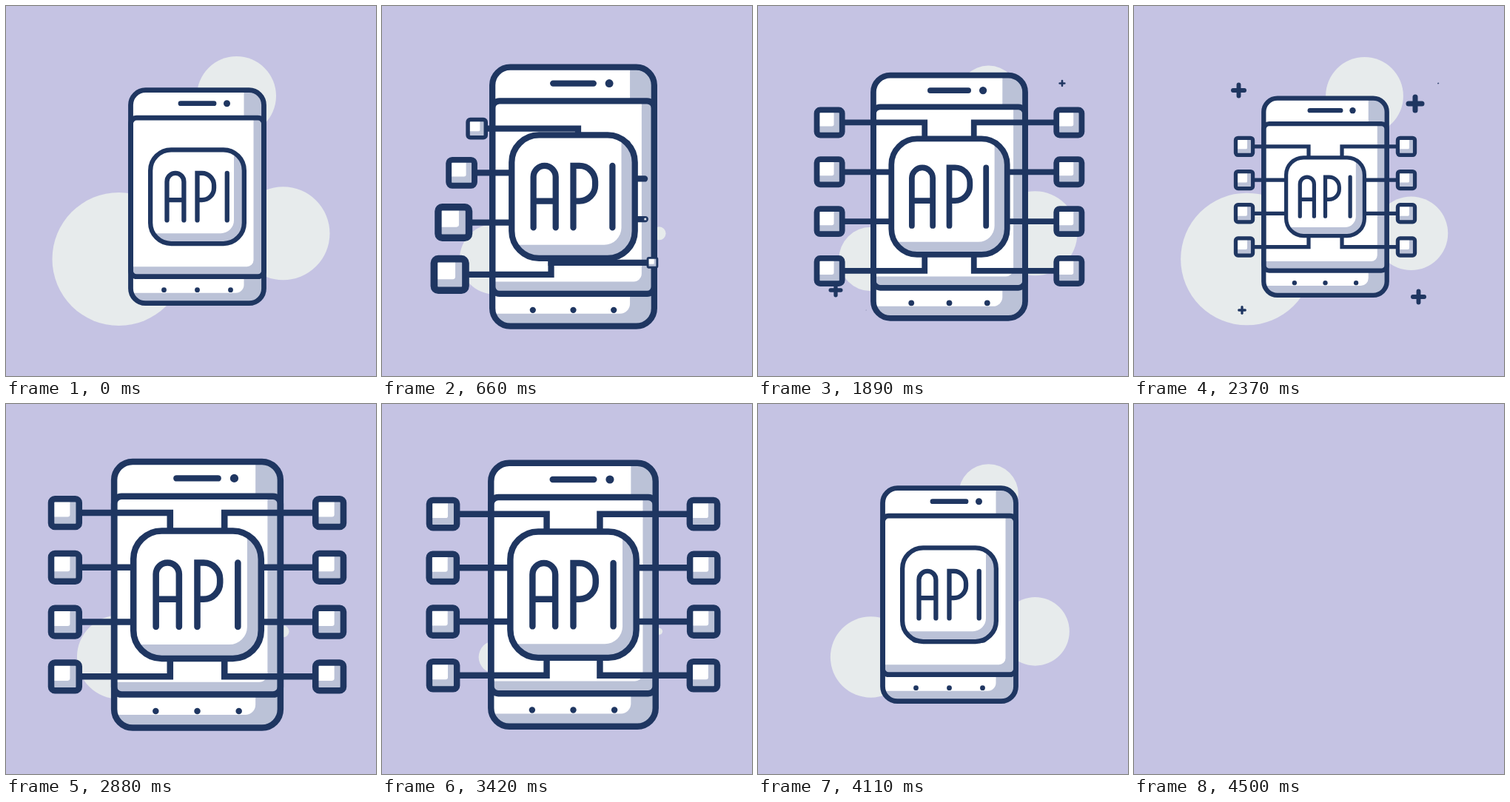
Recreate the animation shown at these times as an HTML page with a canvas. Size 500 by 500 pixels, loop 4.53 s.

```html
<!DOCTYPE html>
<html lang="en">
<head>
<meta charset="utf-8">
<title>API phone</title>
<style>
html, body { margin: 0; width: 100%; height: 100%; overflow: hidden; background: #c5c3e3; }
canvas { display: block; }
</style>
</head>
<body>
<canvas id="stage" width="500" height="500"></canvas>
<script>
const ctx = document.getElementById('stage').getContext('2d');
const LOOP = 4530, STEP = 30, BLANK = 4500;
const CX = 258.5, CY = 257.7;
const BACK = '#c5c3e3', BLOB = '#e7ebec', INK = '#1f3661', SHADE = '#bbc2d7', WHITE = '#fff';

const clamp = x => Math.min(1, Math.max(0, x));
const progress = (t, from, to) => clamp((t - from) / (to - from));
const sine = x => (1 - Math.cos(Math.PI * x)) / 2;
const smooth = x => x * x * (3 - 2 * x);
const outCubic = x => 1 - (1 - x) ** 3;
const snap = x => 1 - (1 - x ** 1.5) ** 4;

// Swells from rest to peak, dips once, returns to the peak and settles.
function pulse(t, rest, peak, dip, dipStart) {
  const swell = outCubic(progress(t, 0, 1370)) - sine(progress(t, 3300, 4090));
  const sink = sine(progress(t, dipStart, 2310)) - snap(progress(t, 2310, 3000));
  return rest + (peak - rest) * swell - (peak - dip) * sink;
}

// Each blob shrinks and regrows twice: full size at 0, from full to again, and at the end.
const blobs = [
  { x: 152.5, y: 342, r: 90, fall: 1400, rise: 700, full: 2254, again: 2360 },
  { x: 311.5, y: 121.5, r: 53.5, fall: 750, rise: 1111, full: 2150, again: 2355 },
  { x: 374.5, y: 307.3, r: 63, fall: 770, rise: 1040, full: 1990, again: 2208 }
];

// x, y and largest size, in order of appearance
const pluses = [
  [105, 384, 19], [411, 104.5, 16], [146, 411, 15.5],
  [141.5, 114, 21], [380, 132, 25], [384.5, 393, 21]
];

function disc(x, y, r, color) {
  ctx.fillStyle = color;
  ctx.beginPath();
  ctx.arc(x, y, r, 0, 7);
  ctx.fill();
}

function box(x0, y0, x1, y1, radius, fill) {
  ctx.beginPath();
  ctx.roundRect(x0, y0, x1 - x0, y1 - y0, radius);
  if (fill) {
    ctx.fillStyle = fill;
    ctx.fill();
  } else ctx.stroke();
}

function line(...points) {
  ctx.beginPath();
  points.forEach(p => ctx.lineTo(...p));
  ctx.stroke();
}

function scaled(x, y, k, draw) {
  ctx.save();
  ctx.translate(x, y);
  ctx.scale(k, k);
  draw();
  ctx.restore();
}

function drawBlob({ x, y, r, fall, rise, full, again }, t) {
  const [from, to] = t < again ? [0, full] : [again, 4385];
  const size = Math.max(1 - (t - from) / fall, 1 - (to - t) / rise);
  disc(x, y, r * clamp(size), BLOB);
}

function drawPlus([x, y, max], index, t) {
  const peak = Math.min(2370, 1900 + 170 * index);
  const size = max * sine(clamp(1 - Math.abs(t - peak) / 400));
  if (size < 0.4) return;
  const arm = size * 0.36;
  ctx.lineWidth = size * 0.28;
  line([x - arm, y], [x + arm, y]);
  line([x, y - arm], [x, y + arm]);
}

function drawPhone() {
  ctx.lineWidth = 6.8;
  box(-90, -144, 90, 144, 20, SHADE);
  box(-90, -144, 63, -106, [20, 0, 0, 0], WHITE);
  box(-90, 108, 63, 130, [0, 0, 11, 0], WHITE);
  box(-90, -106.5, 76, 94.5, [8, 0, 9, 0], WHITE);
  box(-90, -144, 90, 144, 20);
  box(-90, -106.5, 90, 108, 8);
  line([-22.5, -126], [22.5, -126]);
  disc(40, -126, 4.5, INK);
  for (const x of [-45, 0, 45]) disc(x, 126, 3.4, INK);
}

function drawNode() {
  box(-18.75, -18.75, 18.75, 18.75, 5, SHADE);
  box(-16, -16, 6.5, 5.5, [0, 0, 3, 0], WHITE);
  box(-18.75, -18.75, 18.75, 18.75, 5);
}

// Branches pop out one by one, left side first and from the bottom up.
function drawBranch(side, row, t) {
  const age = t - 300 - 60 * (3 - row + (side > 0 ? 4 : 0));
  if (age < -60 || t > 4120) return;
  const outer = row % 3 === 0;
  const sign = row < 2 ? -1 : 1;
  const enter = 78 / (1 + (Math.max(0, age) / 190) ** 4) + Math.max(0, -age) * 0.4;
  const leaveStart = outer ? 3400 : 3450;
  const leave = 130 * sine(progress(t, leaveStart, leaveStart + 650));
  const pull = enter + leave;
  const slope = (outer ? 0.31 : 0.11) - sign * 0.04;
  const x = 177.5 - pull;
  const y = (row - 1.5) * 73.3 - sign * slope * (enter + 1.28 * leave);
  const size = 1.17 * smooth(progress(age, 0, 330)) - 0.17 * smooth(progress(age, 360, 640));

  if (outer) {
    const bend = side * Math.max(-60, 36.5 - pull);
    line([side * x, y], [bend, y], [bend, y - sign * 30]);
  } else line([side * x, y], [side * Math.min(60, x), y]);
  if (size > 0) scaled(side * x, y, size, drawNode);
}

function drawIcon() {
  box(-85.75, -85.75, 85.75, 85.75, 38, SHADE);
  box(-85.75, -85.75, 67, 67, [38, 12, 24, 12], WHITE);
  box(-85.75, -85.75, 85.75, 85.75, 38);
  ctx.stroke(new Path2D(`
    M-55.5 43V-27.5a15.5 15.5 0 0 1 31 0V43M-55.5 6h31
    M0 43V-43H8.5a22 22 0 0 1 22 22V-16a22 22 0 0 1 -22 22H0
    M54.5 -43V43`));
}

function render(t) {
  ctx.fillStyle = BACK;
  ctx.fillRect(0, 0, 500, 500);
  if (t >= BLANK) return;
  ctx.strokeStyle = INK;
  ctx.lineCap = 'round';
  blobs.forEach(blob => drawBlob(blob, t));
  pluses.forEach((plus, i) => drawPlus(plus, i, t));
  scaled(CX, CY, pulse(t, 1, 1.25, 0.889, 1640), drawPhone);
  scaled(CX, CY, pulse(t, 0.739, 1.008, 0.574, 1700), () => {
    ctx.lineWidth = 8.5;
    for (const side of [-1, 1])
      for (let row = 0; row < 4; row++) drawBranch(side, row, t);
    drawIcon();
  });
}

const start = performance.now();
function animate() {
  const t = (performance.now() - start) % LOOP;
  render(Math.floor(t / STEP) * STEP);
  requestAnimationFrame(animate);
}
animate();
</script>
</body>
</html>
```
